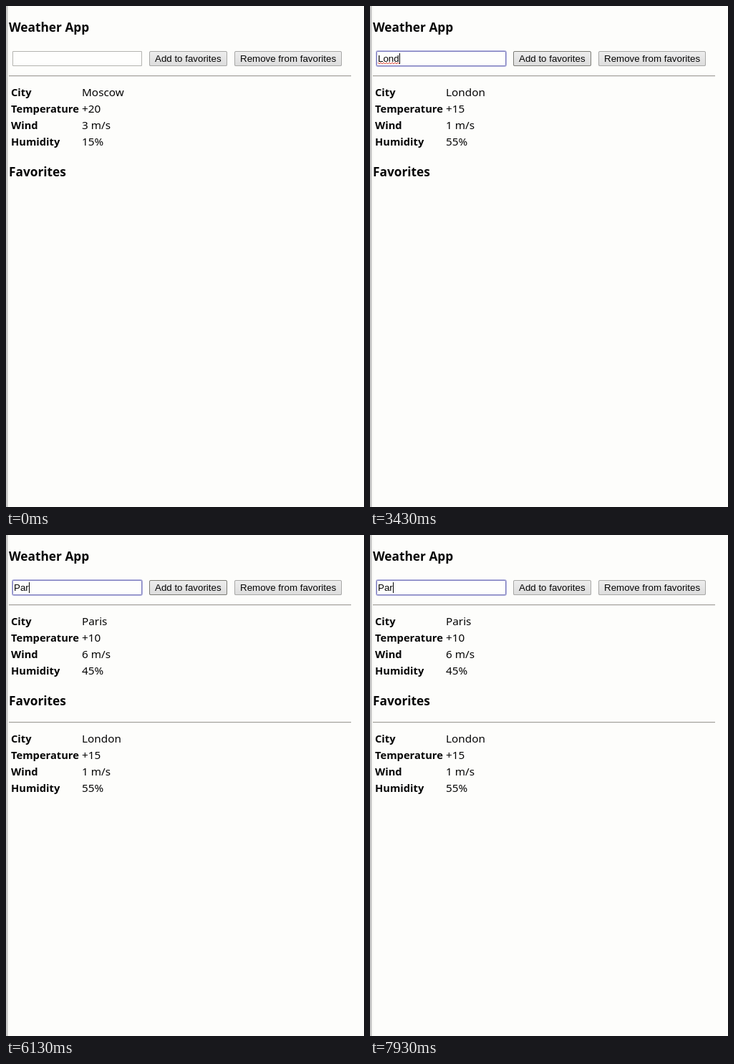
These frames come from a looping animation (500 px wide and 700 px high, 8000 ms). An HTML page with a canvas:

```html
<!DOCTYPE html>
<html lang="en">
<head>
<meta charset="utf-8">
<title>Weather App</title>
<style>
  html, body { margin: 0; width: 100%; height: 100%; overflow: hidden; background: #fdfdfb; }
  canvas { display: block; }
</style>
</head>
<body>
<canvas id="stage" width="500" height="700"></canvas>
<script>
const ctx = document.getElementById('stage').getContext('2d');
const LOOP = 8000;
const INK = '#060606';
const PAPER = '#fdfdfb';
const TITLE_FONT = 'bold 17.3px "Noto Sans", sans-serif';
const LABEL_FONT = 'bold 14.7px "Noto Sans", sans-serif';
const VALUE_FONT = '15.3px "Noto Sans", sans-serif';
const INPUT_FONT = '13.333px "Liberation Sans", Arial, sans-serif';

const LABELS = ['City', 'Temperature', 'Wind', 'Humidity'];
const MOSCOW = ['Moscow', '+20', '3 m/s', '15%'];
const LONDON = ['London', '+15', '1 m/s', '55%'];
const PARIS = ['Paris', '+10', '6 m/s', '45%'];

// Each entry changes part of the page state from its time on.
const EVENTS = [
  [0, { typed: '', city: MOSCOW, favorites: [], focus: false, caret: false,
        misspelt: false, selected: false, hover: '', pressed: false }],
  [1830, { focus: true, caret: true }],
  [2130, { typed: 'L', city: LONDON }],
  [2250, { typed: 'Lo' }],
  [2370, { typed: 'Lon' }],
  [2470, { typed: 'Lond' }],
  [2970, { caret: false }],
  [3070, { hover: 'add' }],
  [3430, { caret: true, misspelt: true }],
  [3600, { focus: false, caret: false, misspelt: false, pressed: true }],
  [3700, { favorites: [LONDON], pressed: false }],
  [4000, { hover: '' }],
  [4200, { focus: true, caret: true }],
  [4370, { selected: true, caret: false }],
  [4970, { typed: 'P', city: PARIS, selected: false, caret: true }],
  [5130, { typed: 'Pa' }],
  [5270, { typed: 'Par' }],
  [5700, { caret: false }],
  [5930, { hover: 'add' }],
  [6130, { caret: true }],
  [6200, { focus: false, caret: false, pressed: true }],
  [6330, { favorites: [LONDON, PARIS], pressed: false }],
  [6530, { hover: '' }],
  [6630, { hover: 'remove' }],
  [7000, { pressed: true }],
  [7170, { favorites: [LONDON], pressed: false }],
  [7470, { hover: '' }],
  [7830, { focus: true }],
  [7930, { caret: true }]
];

function stateAt(time) {
  return Object.assign({}, ...EVENTS.filter(([start]) => start <= time).map(([, change]) => change));
}

function rect(x, y, w, h, color) {
  ctx.fillStyle = color;
  ctx.fillRect(x, y, w, h);
}

function text(value, x, y, font, color = INK) {
  ctx.font = font;
  ctx.fillStyle = color;
  ctx.fillText(value, x, y);
}

function outline(x, y, w, h, radius, color) {
  ctx.strokeStyle = color;
  ctx.lineWidth = 1;
  ctx.beginPath();
  ctx.roundRect(x + 0.5, y + 0.5, w - 1, h - 1, radius);
  ctx.stroke();
}

function rule(y) {
  rect(4, y, 478, 1, '#a09e98');
  rect(4, y + 1, 478, 1, '#ececea');
}

function button(label, x, width, hovered, pressed) {
  const fill = ctx.createLinearGradient(0, 63, 0, 84);
  fill.addColorStop(0, pressed ? '#d4d4d4' : '#eeeeee');
  fill.addColorStop(1, pressed ? '#e0e0e0' : '#dcdcdc');
  ctx.fillStyle = fill;
  ctx.fillRect(x, 63, width, 21);
  outline(x, 63, width, 21, 1.5, hovered ? '#7c7c76' : '#a8a8a6');
  text(label, x + 8, 78, INPUT_FONT);
}

function squiggle(x, end, y) {
  ctx.strokeStyle = '#e0503c';
  ctx.lineWidth = 1;
  ctx.beginPath();
  for (let i = 0; x + i * 2 <= end; i++) ctx.lineTo(x + i * 2, y + (i % 2 ? 1 : -1));
  ctx.stroke();
}

function input(state) {
  rect(9, 63, 181, 21, '#fefefd');
  if (state.focus) {
    outline(8, 62, 183, 23, 2, '#b0b0dc');
    outline(9, 63, 181, 21, 0.5, '#8080c0');
  } else {
    outline(9, 63, 181, 21, 0, '#b4b4b0');
  }
  ctx.font = INPUT_FONT;
  const end = Math.round(11 + ctx.measureText(state.typed).width);
  if (state.selected) rect(11, 66, end - 11, 15, '#8c8cc8');
  text(state.typed, 11, 78, INPUT_FONT, state.selected ? PAPER : INK);
  if (state.misspelt) squiggle(11, end, 80);
  if (state.caret) rect(end, 66, 1, 15, INK);
}

function weather(values, top) {
  LABELS.forEach((label, i) => {
    const y = top + i * 23;
    text(label, 7, y, LABEL_FONT);
    text(values[i], 106, y, VALUE_FONT);
  });
}

function draw(time) {
  const state = stateAt(time);
  rect(0, 0, 500, 700, PAPER);
  rect(0, 0, 1, 700, '#e4e4e4');
  rect(1, 0, 1, 700, '#9c9c9c');
  rect(3, 0, 1, 700, '#ebebe8');

  text('Weather App', 4, 36, TITLE_FONT);
  input(state);
  const isOver = name => state.hover === name;
  button('Add to favorites', 200, 109, isOver('add'), isOver('add') && state.pressed);
  button('Remove from favorites', 319, 150, isOver('remove'), isOver('remove') && state.pressed);
  rule(97);
  weather(state.city, 126);

  text('Favorites', 4, 238, TITLE_FONT);
  state.favorites.forEach((values, i) => {
    rule(261 + i * 112);
    weather(values, 290 + i * 112);
  });
}

const start = performance.now();
function tick() {
  draw((performance.now() - start) % LOOP);
  requestAnimationFrame(tick);
}
tick();
</script>
</body>
</html>
```
